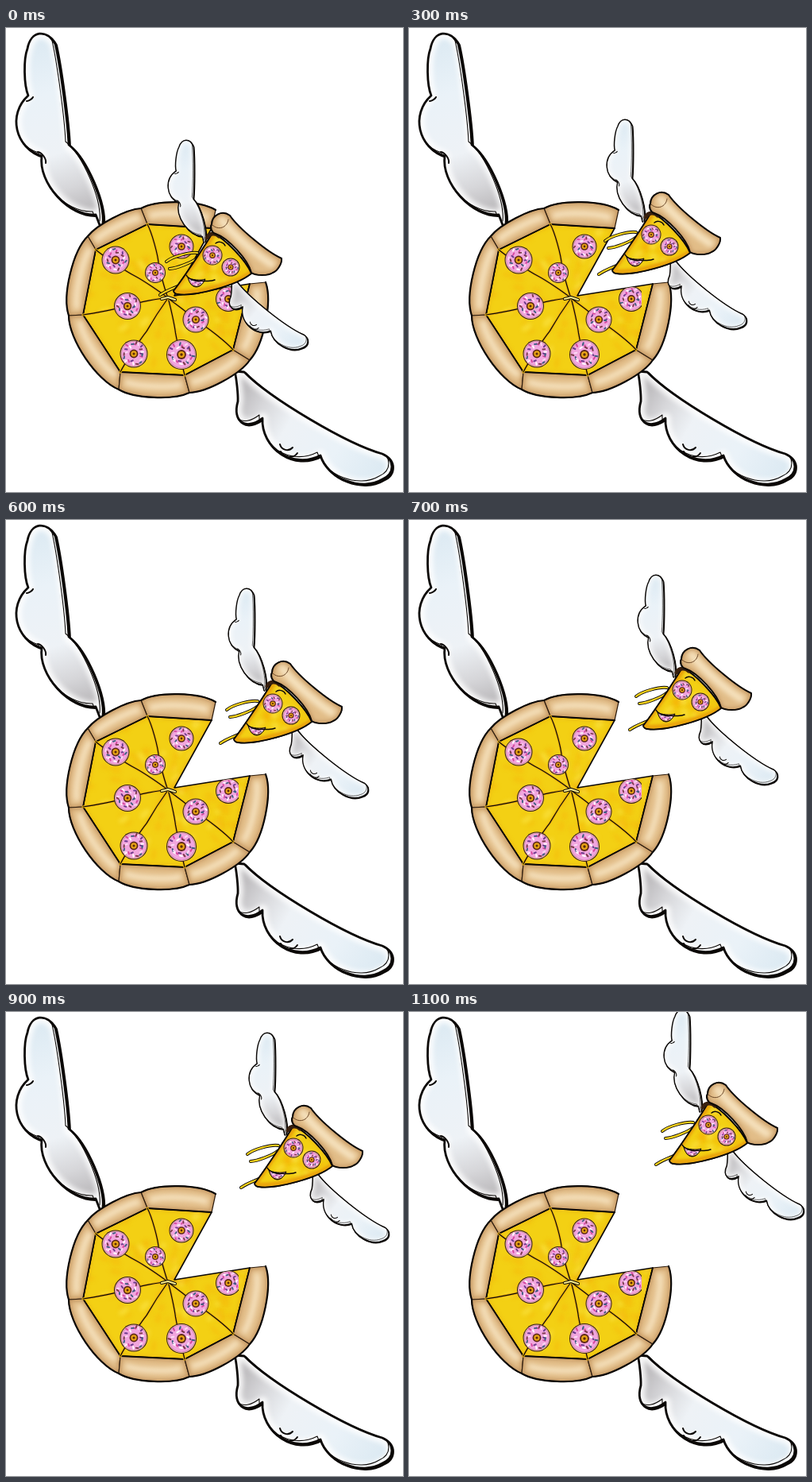
An HTML page with a canvas for the animation above (1300 ms loop, 500 px wide and 584 px high).

```html
<!DOCTYPE html>
<html lang="en">
<head>
<meta charset="utf-8">
<title>Flying pizza slice</title>
<style>
html, body { margin: 0; width: 100%; height: 100%; overflow: hidden; background: #fff; }
canvas { display: block; }
</style>
</head>
<body>
<canvas id="stage" width="500" height="584"></canvas>
<script>
const W = 500, H = 584, LOOP = 1300, STEP = 100, LAST = 11;
const INK = '#0b0806';
const stage = document.getElementById('stage').getContext('2d');

function layer() {
  const c = document.createElement('canvas');
  c.width = W;
  c.height = H;
  const g = c.getContext('2d');
  g.lineCap = g.lineJoin = 'round';
  return g;
}

function random(seed) {
  return () => {
    seed = (seed * 16807) % 2147483647;
    return seed / 2147483647;
  };
}

const mix = (a, b, u) => a.map((v, i) => v + (b[i] - v) * u);

// A chain of bows: each point carries how far the edge leading to it swells.
function bows([x, y], ...points) {
  const path = new Path2D();
  path.moveTo(x, y);
  for (const [px, py, swell = 0] of points) {
    const dx = px - x, dy = py - y, k = swell / .75 / Math.hypot(dx, dy);
    path.bezierCurveTo(
      x + dx * .22 - dy * k, y + dy * .22 + dx * k,
      px - dx * .22 - dy * k, py - dy * .22 + dx * k, px, py);
    [x, y] = [px, py];
  }
  return path;
}

function line(g, path, width = 1.4, color = INK) {
  g.strokeStyle = color;
  g.lineWidth = width;
  g.stroke(path);
}

function fill(g, path, color) {
  g.fillStyle = color;
  g.fill(path);
}

function dot(g, x, y, r, color) {
  g.fillStyle = color;
  g.beginPath();
  g.arc(x, y, r, 0, 7);
  g.fill();
}

function inside(g, path, draw) {
  g.save();
  g.clip(path);
  draw();
  g.restore();
}

function soft(g, blur, draw) {
  g.save();
  g.filter = `blur(${blur}px)`;
  draw();
  g.restore();
}

const wings = {
  upper: {
    root: [120, 247], tip: [45, 5],
    path: bows([122, 247], [79, 147, 10], [62, 20, 2], [27, 26, 16], [28, 85, 4],
      [45, 161, 23], [113, 235, 20], [118, 248]),
    marks: [bows([40, 156], [50, 170, -3]), bows([26, 92], [34, 87, 1])]
  },
  lower: {
    root: [288, 432], tip: [486, 550],
    path: bows([288, 432], [292, 470, -1], [323, 491, 19], [396, 538, 25], [474, 568, 18],
      [474, 536, 12], [300, 433, -9], [288, 432]),
    marks: [bows([345, 524], [361, 528, 5]), bows([346, 533], [367, 535, 6])]
  }
};

function wing(g, { root, tip, path, marks }, at = root, scale = 1, turn = 0) {
  g.save();
  g.translate(...at);
  g.rotate(turn);
  g.scale(scale, scale);
  g.translate(-root[0], -root[1]);

  const shade = g.createLinearGradient(...tip, ...root);
  [[0, '#dbe9f2'], [.3, '#eaf2f8'], [.6, '#eef2f6'], [.78, '#d6d6d9'], [1, '#aaa7a9']]
    .forEach(stop => shade.addColorStop(...stop));
  g.save();
  g.translate(1.4, 1.4);
  line(g, path, 3);
  g.restore();
  fill(g, path, shade);
  inside(g, path, () => {
    soft(g, 3, () => line(g, path, 13, 'rgba(255,255,255,.9)'));
    g.translate(-4, -4);
    line(g, path, 1.1);
  });
  line(g, path, 2.8);
  marks.forEach(m => line(g, m, 2));
  g.restore();
}

function crust(g, path, shine, width) {
  fill(g, path, '#e2bd88');
  inside(g, path, () => {
    soft(g, 2.5, () => line(g, path, 5, '#c2945f'));
    soft(g, 3, () => line(g, shine, width, '#f6e3c0'));
  });
  line(g, path, 1.2, '#2c1b0d');
}

function cheese(g, path, [x, y], size, count) {
  const rnd = random(77);
  fill(g, path, '#f3d014');
  inside(g, path, () => soft(g, 2.5, () => {
    for (let i = 0; i < count; i++) {
      const a = rnd() * 7, d = rnd() * size;
      g.fillStyle = i % 3 ? 'rgba(246,178,8,.38)' : 'rgba(252,228,70,.6)';
      g.beginPath();
      g.ellipse(x + Math.cos(a) * d, y + Math.sin(a) * d, 3 + rnd() * 6, 2 + rnd() * 3, a, 0, 7);
      g.fill();
    }
    line(g, path, 3, '#ebb010');
  }));
  line(g, path, 1.6);
}

function donut(g, x, y, r) {
  const rnd = random(x * 91 + y * 37);
  const tints = ['#6d3a8c', '#fff', '#d6489f', '#3d5f80', '#fbd9f4', '#7c3a4a'];
  dot(g, x, y, r, '#33141f');
  dot(g, x, y, r - 1, '#e6c394');
  dot(g, x, y, r - 1.8, '#d67fc3');
  dot(g, x, y, r - 2.6, '#f1a6de');
  for (let i = 0; i < 24; i++) {
    const a = i * 2.4, d = r * (.44 + .38 * rnd()), turn = rnd() * 6;
    const sx = x + Math.cos(a) * d, sy = y + Math.sin(a) * d;
    const dx = Math.cos(turn) * r * .075, dy = Math.sin(turn) * r * .075;
    line(g, bows([sx - dx, sy - dy], [sx + dx, sy + dy]), r * .11, tints[i % 6]);
  }
  dot(g, x, y, r * .31, '#5c2817');
  dot(g, x, y, r * .21, '#e9a414');
  dot(g, x, y, r * .09, '#5b2b0b');
}

// Corners of the crust, counter-clockwise from the missing slice.
const outer = [[264, 229], [170, 227], [103, 262], [79, 362], [142, 455], [231, 459], [307, 418], [327, 320]];
const inner = [[259, 252], [178, 247], [113, 279], [97, 361], [144, 433], [225, 437], [286, 405], [307, 322]];
const hub = [204, 340], apex = [212, 337];

function drawPie() {
  const g = layer();
  const rnd = random(5);
  wing(g, wings.upper);
  wing(g, wings.lower);

  const base = bows(apex, ...inner, apex);
  cheese(g, base, hub, 115, 110);

  const rim = outer.map((p, i) => {
    const q = outer[i - 1] || p;
    return [...p, Math.hypot(p[0] - q[0], p[1] - q[1]) ** 2 / 1000];
  });
  for (let i = 1; i < outer.length; i++) {
    const from = mix(outer[i - 1], inner[i - 1], .42), to = mix(outer[i], inner[i], .42);
    const shine = bows(mix(from, to, .12), [...mix(from, to, .88), rim[i][2] * .4]);
    crust(g, bows(outer[i - 1], rim[i], inner[i], inner[i - 1], outer[i - 1]), shine, 7);
  }
  line(g, bows(...rim), 2.2);
  line(g, bows(...inner), 1.8);

  for (const corner of inner.slice(1, -1)) {
    const cut = bows(corner, [...mix(corner, hub, .55), rnd() * 4 - 2], [...hub, rnd() * 4 - 2]);
    line(g, cut, 3.2, '#ecb211');
    line(g, cut, 1.2);
  }
  const crumb = bows([196, 341], [204, 339], [213, 342]);
  line(g, crumb, 4);
  line(g, crumb, 2.2, '#f8e98a');

  [[138, 292, 17.5], [221, 275, 15.5], [188, 308, 13], [153, 350, 17],
    [239, 367, 16.5], [161, 410, 17.5], [221, 411, 19]].forEach(d => donut(g, ...d));
  inside(g, base, () => {
    g.beginPath();
    g.rect(250, 300, 43, 70);
    g.clip();
    donut(g, 280, 341, 16);
  });
  return g.canvas;
}

function drawSlice() {
  const g = layer();
  wing(g, wings.upper, [250, 269], .515, .135);
  wing(g, wings.lower, [284, 317], .535, .14);

  const strands = [
    bows([241, 283], [202, 294, 3]),
    bows([240, 290], [206, 303, -2]),
    bows([223, 323], [194, 336, 1])
  ];
  strands.forEach(s => line(g, s, 4));
  strands.forEach(s => line(g, s, 2.2, '#f6d31b'));

  const body = bows([260, 258], [211, 331, -1], [216, 335, 1], [309, 309, 7], [260, 258, 5]);
  cheese(g, body, [255, 300], 45, 34);
  inside(g, body, () => soft(g, 1.5, () =>
    line(g, bows([260, 262], [211, 332], [309, 308, 7]), 6, '#e9a30c')));
  line(g, body, 1.8);

  donut(g, 260, 286, 12.5);
  donut(g, 283, 301, 11.5);
  const tongue = bows([229, 314], [251, 316, 2], [229, 314, -11]);
  inside(g, tongue, () => donut(g, 240, 315, 11));
  line(g, tongue, 1);
  line(g, bows([227, 311], [246, 318, 3], [263, 317, 1]), 1.5);
  line(g, bows([264, 271], [276, 274, -3]));

  line(g, bows([253, 264], [268, 262, -4]), 5, '#38200f');
  const roll = bows([347, 290], [282, 236, -4], [259, 247, 8], [264, 259, 3],
    [309, 308, -6], [336, 308, 3], [347, 290, 3]);
  crust(g, roll, bows([272, 242], [334, 297, 3]), 9);
  line(g, roll, 2);
  line(g, bows([260, 248], [280, 241, 7]), 1, '#6b4727');
  return g.canvas;
}

// Flight of the slice: step, x, y.
const flight = [[0, 0, 0], [2, 22, -14], [3, 45, -26], [6, 76, -55],
  [8, 91, -89], [9, 102, -115], [LAST, 117, -144]];

function offset(step) {
  const i = Math.max(1, flight.findIndex(k => k[0] >= step));
  const a = flight[i - 1], b = flight[i];
  return mix(a, b, (step - a[0]) / (b[0] - a[0])).slice(1).map(Math.round);
}

const pie = drawPie(), slice = drawSlice();
const start = performance.now();

function frame(now) {
  const t = Math.max(0, now - start) % LOOP;
  const step = Math.min(LAST, Math.floor(t / STEP));
  stage.fillStyle = '#fff';
  stage.fillRect(0, 0, W, H);
  stage.drawImage(pie, 0, 0);
  stage.drawImage(slice, ...offset(step));
  requestAnimationFrame(frame);
}
frame(start);
</script>
</body>
</html>
```
